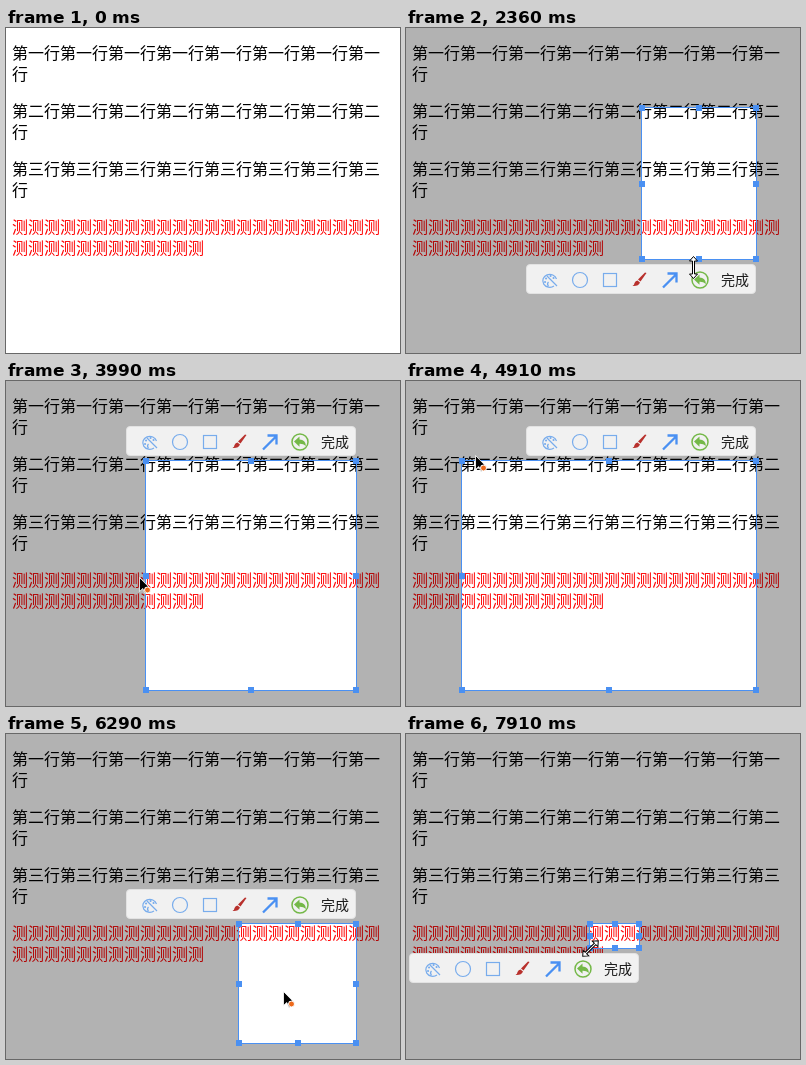
Animation of 394 by 325 pixels, one loop 7.99 s. Source, as an HTML page:

```html
<!DOCTYPE html>
<html lang="zh-CN">
<head>
<meta charset="utf-8">
<style>
  html, body { margin: 0; width: 100%; height: 100%; overflow: hidden; background: #fff; }
  main {
    position: absolute; left: 6px; top: 14px; width: 370px;
    font: 16px/21px "Noto Sans CJK SC", "Noto Sans CJK", sans-serif;
    color: #000; word-break: break-all;
  }
  p { margin: 0 0 16px; }
  .red { color: #f00; }
  svg { position: absolute; left: 0; top: 0; }
  .blue { fill: none; stroke: #78acec; stroke-width: 1.2; }
  .blue .dots { stroke-width: 2; stroke-linecap: round; }
  #bar text { font: 14px "Noto Sans CJK SC", "Noto Sans CJK", sans-serif; fill: #1c1c1c; }
</style>
</head>
<body>
<main>
  <p>第一行第一行第一行第一行第一行第一行第一行第一行</p>
  <p>第二行第二行第二行第二行第二行第二行第二行第二行</p>
  <p>第三行第三行第三行第三行第三行第三行第三行第三行</p>
  <p class="red">测测测测测测测测测测测测测测测测测测测测测测测测测测测测测测测测测测测</p>
</main>
<svg width="394" height="325" viewBox="0 0 394 325">
  <path id="dim" fill="#000" fill-opacity=".3" fill-rule="evenodd"/>
  <g id="frame">
    <path id="edge" fill="none" stroke="#4a90f2"/>
    <path id="grips" fill="#4a90f2"/>
  </g>
  <g id="bar">
    <rect x=".5" y=".5" width="229" height="29" rx="3.5" fill="#f1f1f1" stroke="#e2e2e2"/>
    <g class="blue">
      <path d="M28 22A7 6.500 0 1 1 30.500 15M22.500 22q-2-2 0-4M21 12L31 22"/>
      <path class="dots" d="M20 14.500h.1M24.500 12h.1M27.500 14h.1M19 18h.1"/>
      <circle cx="54" cy="16" r="7.500"/>
      <rect x="77.500" y="9.500" width="13" height="13"/>
    </g>
    <g fill="#b8302c">
      <path d="M120.500 9L114.500 17.500 112 15.500 119 8.500z"/>
      <path d="M111.500 16.500l2.500 2q-1.500 4-7.500 3.500 2-1 2-3 1-2.500 3-2.500z"/>
    </g>
    <path d="M137 23.500L150 10.500M141.500 9.500h9V18.500" fill="none" stroke="#4a90f2" stroke-width="2.300"/>
    <circle cx="174" cy="16" r="8" fill="none" stroke="#74b848" stroke-width="1.500"/>
    <path d="M168 15.500l5.500-5v3q6 0 6.500 6.500-3-2.500-6.500-2.300v3z" fill="#74b848"/>
    <text x="195" y="21">完成</text>
  </g>
  <g id="arrow">
    <path d="M.5.500V14.500L3.800 11.500 6 16.500 8.300 15.500 6.200 10.700H10.500Z" fill="#000" stroke="#fff" stroke-width=".8"/>
    <circle cx="8.500" cy="13" r="3" fill="#ee6a1c" stroke="#fff"/>
  </g>
  <path id="resize" d="M0-11L4-6.500H1V6.500H4L0 11-4 6.500H-1V-6.500H-4Z" fill="#fff" stroke="#000"/>
</svg>
<script>
const LOOP = 7990;
const STEP = 76;
const LEAD = 20;        // the selection trails the pointer by this many ms
const DIM_AT = 510, READY_AT = 1360;

const easeOut = p => 1 - (1 - p) ** 2;
const linear = p => p;
const lerp = (a, b, p) => a + (b - a) * p;

// angle: tilt of the double arrow, null for the plain pointer
const glide = (start, end, x, y, angle = null) =>
  ({ start, end, x, y, angle, edges: '', ease: easeOut });
// edges: sides of the selection that follow the pointer (l, t, r, b)
const drag = (edges, start, end, x, y, angle = null, ease = easeOut) =>
  ({ start, end, x, y, angle, edges, ease });

const gestures = [
  glide(134, 360, 303, 184),
  glide(434, 700, 350, 80),
  drag('lb', 740, 1360, 236, 198),
  glide(1360, 1960, 287, 198, 0),
  drag('b', 2284, 2750, 287, 309, 0),
  glide(2904, 3520, 236, 195, 90),
  drag('l', 3764, 4483, 56, 196),
  glide(4483, 4600, 112, 146),
  glide(4600, 4990, 67, 70),
  glide(5144, 5310, 62, 83, -45),
  drag('lt', 5594, 5822, 179, 149, -45, linear),
  drag('lt', 5822, 6110, 233, 190, -45),
  glide(6110, 6440, 295, 284),
  glide(6444, 6820, 352, 314, -45),
  glide(7224, 7376, 348, 307, -45),
  drag('rb', 7376, 7910, 184, 214, -45)
];

// Replays all gestures up to time t
function replay(t) {
  const box = { l: 350, t: 80, r: 350, b: 80 };
  const pointer = { x: 303, y: 450, angle: null };
  for (const g of gestures) {
    if (t < g.start) break;
    const stepped = Math.floor((t - g.start + 5) / STEP) * STEP;
    const progress = ms => g.ease(Math.min(1, ms / (g.end - g.start)));
    const p = t >= g.end ? 1 : progress(stepped);
    const ahead = g.edges && p ? progress(stepped + LEAD) : p;
    for (const e of g.edges)
      box[e] = Math.round(lerp(box[e], 'lr'.includes(e) ? g.x : g.y, p));
    pointer.x = Math.round(lerp(pointer.x, g.x, ahead));
    pointer.y = Math.round(lerp(pointer.y, g.y, ahead));
    pointer.angle = g.edges || p === 1 ? g.angle : null;
  }
  const flipped = (box.r < box.l) !== (box.b < box.t);
  if (flipped && pointer.angle) pointer.angle *= -1;
  return { box, pointer };
}

const [dim, frame, edge, grips, bar, arrow, resize] =
  ['dim', 'frame', 'edge', 'grips', 'bar', 'arrow', 'resize']
    .map(id => document.getElementById(id));

const show = (el, on) => el.setAttribute('display', on ? 'inline' : 'none');
const place = (el, x, y, angle = 0) =>
  el.setAttribute('transform', `translate(${x} ${y}) rotate(${angle})`);
const rect = (x, y, w, h) => `M${x} ${y}h${w}v${h}h${-w}z`;

function drawBox(box) {
  const l = Math.min(box.l, box.r), r = Math.max(box.l, box.r);
  const t = Math.min(box.t, box.b), b = Math.max(box.t, box.b);
  const w = r - l, h = b - t;
  dim.setAttribute('d', rect(0, 0, 394, 325) + rect(l, t, w, h));
  edge.setAttribute('d', rect(l - .5, t - .5, w + 1, h + 1));

  const xs = [l, Math.round((l + r) / 2), r];
  const ys = [t, Math.round((t + b) / 2), b];
  grips.setAttribute('d', xs.flatMap((x, i) => ys.map((y, j) =>
    i === 1 && j === 1 ? '' : rect(x - 3, y - 3, 6, 6))).join(''));

  // The toolbar goes below the selection when it fits, else above
  place(bar, r - 230, b + 35 <= 325 ? b + 5 : t - 35);
}

function drawPointer({ x, y, angle }) {
  show(arrow, angle === null);
  show(resize, angle !== null);
  if (angle === null) place(arrow, x, y);
  else place(resize, x + .5, y + .5, angle);
}

function draw(t) {
  const { box, pointer } = replay(t);
  show(dim, t >= DIM_AT);
  show(frame, t >= READY_AT);
  show(bar, t >= READY_AT);
  drawBox(box);
  drawPointer(pointer);
}

const origin = performance.now();
function tick() {
  draw((performance.now() - origin) % LOOP);
  requestAnimationFrame(tick);
}
tick();
</script>
</body>
</html>
```
